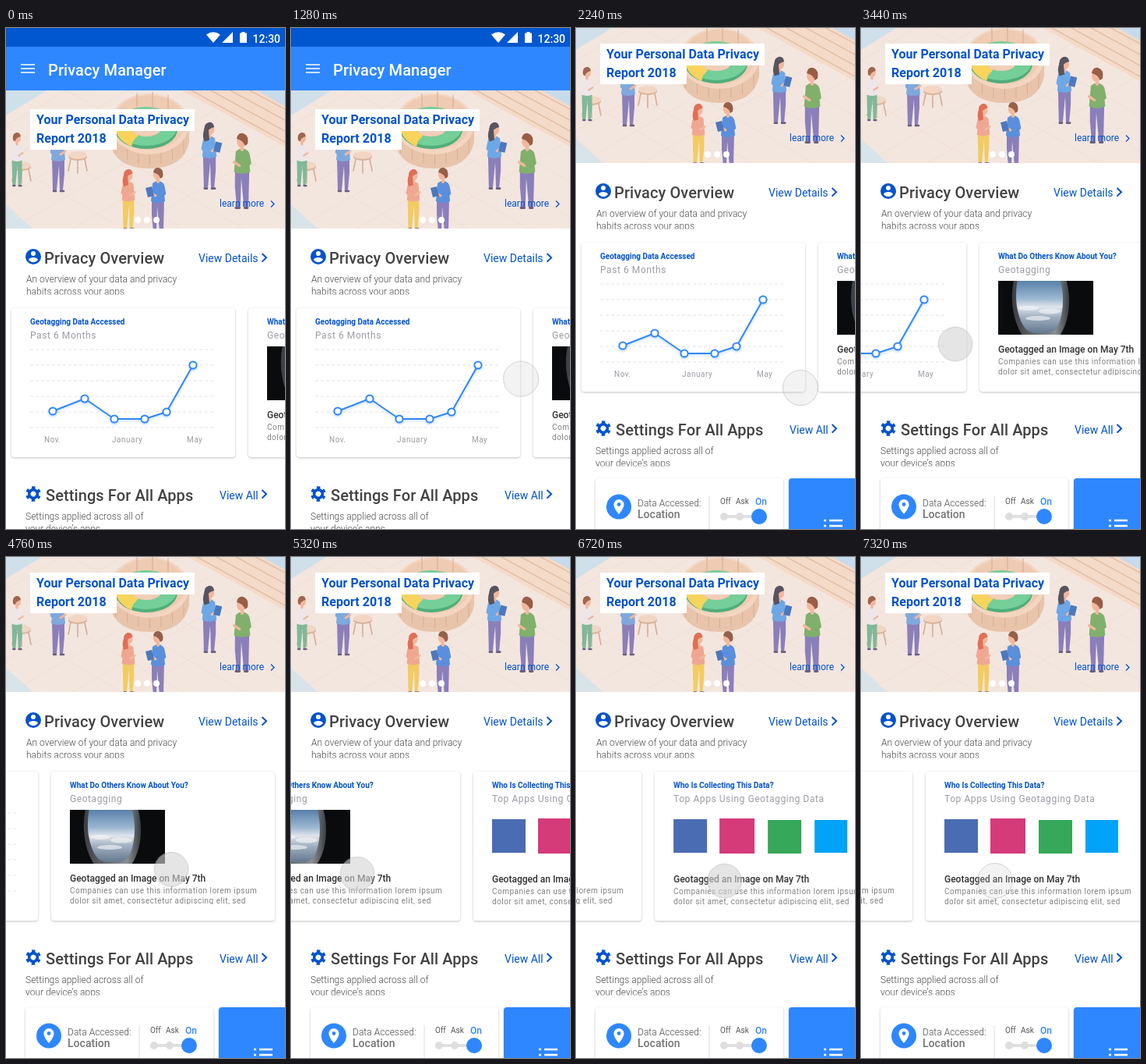
Animation, 358 px wide and 642 px high, one loop 8 s. Source, as an HTML page:

```html
<!DOCTYPE html>
<html lang="en">
<head>
<meta charset="utf-8">
<title>Privacy Manager</title>
<style>
html, body { margin: 0; width: 100%; height: 100%; overflow: hidden; background: #fff; }
svg { display: block; width: 358px; height: 642px; font-family: Roboto, Inter, sans-serif; }
.bar { font-size: 20px; font-weight: 500; letter-spacing: .1px; fill: #fff; }
.clock { font-size: 14px; font-weight: 500; fill: #fff; }
.banner { font-size: 16px; font-weight: 700; letter-spacing: .03px; fill: #0052cc; }
.head { font-size: 20px; font-weight: 500; letter-spacing: .09px; fill: #424242; }
.link { font-size: 14px; fill: #0052cc; }
.more { font-size: 12px; fill: #0052cc; }
.note { font-size: 12px; font-weight: 300; letter-spacing: .03px; fill: #484848; }
.title { font-size: 10px; font-weight: 700; fill: #0052cc; }
.sub { font-size: 12px; letter-spacing: .57px; fill: #9a9ba2; }
.strong { font-size: 12px; font-weight: 500; fill: #303030; }
.body { font-size: 10px; letter-spacing: .47px; fill: #808080; }
.axis { font-size: 10px; letter-spacing: .5px; fill: #9a9ba2; }
.card { fill: #fff; filter: drop-shadow(0 1px 1.5px rgba(0,0,0,.24)); }
.chev { fill: none; stroke: #0052cc; stroke-width: 2; }
.chev.thin { stroke-width: 1.3; }
</style>
</head>
<body>
<svg viewBox="0 0 358 642">
  <defs>
    <clipPath id="bannerClip"><rect y="80" width="358" height="177"/></clipPath>
    <clipPath id="noteClip"><rect y="310" width="358" height="31.5"/><rect y="615" width="358" height="30.5"/></clipPath>
    <clipPath id="cardClip"><rect y="358" width="285" height="171"/></clipPath>
    <clipPath id="photoClip"><rect x="24" y="408" width="122" height="69"/></clipPath>
    <linearGradient id="sky" x2="0" y2="1">
      <stop offset="0" stop-color="#46729f"/><stop offset=".4" stop-color="#9db8d2"/>
      <stop offset=".54" stop-color="#e0e5eb"/><stop offset=".72" stop-color="#9fafc0"/>
      <stop offset="1" stop-color="#64788e"/>
    </linearGradient>
    <linearGradient id="rim"><stop offset="0" stop-color="#3a3e42"/><stop offset=".75" stop-color="#8b9094"/><stop offset="1" stop-color="#3a3e42"/></linearGradient>
  </defs>
  <rect width="358" height="642" fill="#fff"/>
  <g id="page">
    <g id="scene" clip-path="url(#bannerClip)"></g>
    <path d="M31 104H242V132H142V156H31z" fill="#fff"/>
    <text class="banner" x="39" y="123">Your Personal Data Privacy</text>
    <text class="banner" x="39" y="147">Report 2018</text>
    <text class="more" x="274" y="229">learn more</text>
    <path class="chev thin" d="M340 221.5l4 4-4 4"/>
    <g fill="#fff"><circle cx="169" cy="246" r="4"/><circle cx="181" cy="246" r="4"/><circle cx="193" cy="246" r="4"/></g>

    <rect y="24" width="358" height="56" fill="#2e87ff"/>
    <rect width="358" height="24" fill="#0057cf"/>
    <path d="M257 8.5Q266 2 275 8.5L266 19zM291 5V19H277zM300 6.5h2.5V5h4v1.5H309V19H300z" fill="#fff"/>
    <text class="clock" x="316.5" y="19">12:30</text>
    <path d="M19 47H37M19 52H37M19 57H37" stroke="#fff" stroke-width="1.6"/>
    <text class="bar" x="54" y="61">Privacy Manager</text>

    <g transform="translate(35 293)"><circle r="10" fill="#0052cc"/><circle cy="-4" r="3" fill="#fff"/><path d="M0 .9C2 .9 6 2 6 4 4.7 5.9 2.5 7.2 0 7.2S-4.7 5.9-6 4C-6 2-2 .9 0 .9z" fill="#fff"/></g>
    <text class="head" x="49" y="302">Privacy Overview</text>
    <text class="link" x="247" y="300">View Details</text>
    <path class="chev" d="M328.5 289l5.5 5.3-5.5 5.3"/>
    <g clip-path="url(#noteClip)">
      <text class="note" x="26" y="326">An overview of your data and privacy</text>
      <text class="note" x="26" y="342">habits across your apps</text>
      <text class="note" x="25" y="630">Settings applied across all of</text>
      <text class="note" x="25" y="646">your device’s apps</text>
    </g>

    <g id="cards">
      <g transform="translate(7)">
        <rect class="card" y="359" width="287" height="191" rx="4"/>
        <text class="title" x="24" y="380">Geotagging Data Accessed</text>
        <text class="sub" x="24" y="398">Past 6 Months</text>
        <g id="chart"></g>
        <text class="axis" x="42" y="531">Nov.</text>
        <text class="axis" x="129" y="531">January</text>
        <text class="axis" x="225" y="531">May</text>
      </g>
      <g transform="translate(311)">
        <rect class="card" y="359" width="287" height="191" rx="4"/>
        <text class="title" x="24" y="380">What Do Others Know About You?</text>
        <text class="sub" x="24" y="398">Geotagging</text>
        <g clip-path="url(#photoClip)">
          <rect x="24" y="408" width="122" height="69" fill="#090b0d"/>
          <path d="M46 400C38 425 41 460 58 482H100C117 462 119 425 109 400z" fill="url(#rim)"/>
          <path d="M50 402C44 426 47 452 58 468Q63 475 74 475H88Q99 473 103 460C109 440 108 420 102 402z" fill="url(#sky)"/>
          <g fill="#f3f5f8" opacity=".65"><ellipse cx="63" cy="443" rx="13" ry="3"/><ellipse cx="90" cy="447" rx="14" ry="3.5"/><ellipse cx="75" cy="456" rx="16" ry="3"/></g>
        </g>
        <g class="copy"></g>
      </g>
      <g transform="translate(615)">
        <rect class="card" y="359" width="287" height="191" rx="4"/>
        <text class="title" x="24" y="380">Who Is Collecting This Data?</text>
        <text class="sub" x="24" y="398">Top Apps Using Geotagging Data</text>
        <rect x="24" y="420" width="43" height="43" fill="#4a6cb3"/>
        <rect x="83" y="419" width="45" height="45" fill="#d53a79"/>
        <rect x="145" y="421" width="43" height="43" fill="#37a75a"/>
        <rect x="205" y="421" width="42" height="42" fill="#00a3f7"/>
        <g class="copy" transform="translate(0 1)"></g>
      </g>
    </g>

    <g transform="translate(35 597) rotate(30)" fill="none" stroke="#0052cc"><circle r="5.3" stroke-width="3.8"/><circle r="8" stroke-width="3.6" stroke-dasharray="4.19" stroke-dashoffset="2.1"/></g>
    <text class="head" x="51" y="606">Settings For All Apps</text>
    <text class="link" x="274" y="604">View All</text>
    <path class="chev" d="M328.5 592l5.5 5.3-5.5 5.3"/>

    <rect class="card" x="25" y="661" width="241" height="110" rx="4"/>
    <rect class="card" x="273" y="661" width="120" height="110" rx="4" style="fill:#2e87ff"/>
    <g transform="translate(55 697.5)"><circle r="16" fill="#2e87ff"/><path d="M0-9.5A6.6 6.6 0 0 1 6.6-3C6.6 2 0 9.5 0 9.5S-6.6 2-6.6-3A6.6 6.6 0 0 1 0-9.5z" fill="#fff"/><circle cy="-3" r="2.4" fill="#2e87ff"/></g>
    <text class="note" x="79" y="697">Data Accessed:</text>
    <text x="79" y="712" font-size="14" font-weight="500" fill="#757575">Location</text>
    <path d="M171 684V760" stroke="#ddd"/>
    <g font-size="10" fill="#555"><text x="185" y="694">Off</text><text x="205" y="694">Ask</text></g>
    <text x="230" y="695" font-size="12" font-weight="500" fill="#2e87ff">On</text>
    <path d="M190 710H230" stroke="#e0e0e0" stroke-width="4"/>
    <g fill="#dedede"><circle cx="190" cy="710" r="5"/><circle cx="210" cy="710" r="5"/></g>
    <circle cx="235" cy="710" r="10" fill="#2e87ff"/>
    <path d="M318 715H321M325 715H342M318 722H321M325 722H342" stroke="#fff" stroke-width="2.3"/>
  </g>
  <g id="finger"><circle id="touch" r="22.5" fill="#d4d4d4" stroke="#999" stroke-opacity=".6" stroke-width=".7"/></g>
</svg>
<script>
const LOOP = 8000;
const SMOOTH = 'cubic-bezier(.4,0,.2,1)';
const $ = id => document.getElementById(id);

// Banner artwork
const ellipse = (x, y, rx, ry, fill) => `<ellipse cx="${x}" cy="${y}" rx="${rx}" ry="${ry}" fill="${fill}"/>`;
const shape = (d, fill) => `<path d="${d}" fill="${fill}"/>`;
const line = (d, color, width) => `<path d="${d}" fill="none" stroke="${color}" stroke-width="${width}" stroke-linecap="round" stroke-linejoin="round"/>`;

// A standing figure 86 units tall, top of the head at (x, y)
function person(x, y, size, hair, top, pants, face, long, tablet) {
  const skin = '#f2b79d';
  return `<g transform="translate(${x} ${y}) scale(${size * face} ${size})">` +
    shape('M-8 40H8L8 60 6 82H2L1 50-2 82H-7z', pants) +
    line('M-6 83H-3M3 83H7', '#6b5f80', 2.6) +
    shape('M-7 20Q0 14 7 20L9 43Q0 47 -9 43z', top) +
    line('M-6 23L-8 33 3 36', top, 4.5) + line('M3 36L9 32', skin, 3) +
    (tablet ? shape('M8 24l8 2-3 12-8-2z', '#4c78bd') : '') +
    line('M0 12V18', skin, 4) +
    ellipse(1, 9, 5, 6.5, skin) +
    shape('M6 6Q5-1-1 0-8 2-6 12L-3 14Q-2 8 6 6z', hair) +
    (long ? shape('M-6 7Q-10 17-6 24L0 22-1 10z', hair) : '') + '</g>';
}

function stool(x, y) {
  return line(`M${x - 8} ${y}l-4 20M${x + 8} ${y}l4 20M${x} ${y}v23`, '#d5ad94', 1.6) +
    ellipse(x, y + 2, 12, 5, '#d9b299') + ellipse(x, y, 12, 5, '#f2d6c3');
}

function scene() {
  let art = '<rect y="80" width="358" height="177" fill="#f3e6df"/>';
  let tiles = '', steps = '';
  for (let i = -2; i < 7; i++) tiles += `M${i * 78} 80l310 180M${i * 78} 80l-310 180`;
  art += line(tiles, '#f0dfd5', 1);
  art += shape('M0 80H52L0 112z', '#cfe0ea') + shape('M0 226L34 257H0z', '#d8e3ea');

  // Stairs in the far right corner
  art += shape('M226 80H358V152z', '#f4dac8');
  for (let i = 0; i < 5; i++) steps += `M${238 + i * 25} 80L358 ${146 - i * 14}`;
  art += line(steps, '#e2bfa8', 1.5) + shape('M322 80H358V100z', '#c6dcec');

  // Round table with a ring chart on top
  art += shape('M133 124V146Q140 180 184 180T235 146V124z', '#e8c4ab');
  for (let i = 0; i < 7; i++) art += line(`M${141 + i * 14.5} ${157 + 18 * Math.sin(Math.PI * (i + .5) / 7)}v-18`, '#d9ae93', 1);
  art += ellipse(184, 123, 51, 39, '#f3d5c0') + ellipse(184, 121, 46, 35, '#eecbb2');
  art += ellipse(180, 130, 40, 25, '#4fae7b') + ellipse(180, 126, 40, 25, '#74cf99');
  art += shape('M180 126L140 126Q141 143 161 152L163 145z', '#f8d45d');
  art += ellipse(180, 128, 20, 11, '#ddb59c') + ellipse(180, 130, 18, 9, '#f0cfb8');
  art += line('M168 84V104M188 82V104M208 86V104', '#d9af96', 1.2);

  art += stool(20, 176) + stool(92, 163);
  art += person(14, 134, .82, '#a0654d', '#eee6e8', '#7fb89a', 1, false, false);
  art += person(67, 126, 1, '#4d4b63', '#7fa9dd', '#8b7fba', 1, true, false);
  art += person(261, 121, 1.02, '#58545f', '#6da7e6', '#8a7fba', 1, true, true);
  art += person(303, 135, 1.15, '#9a5c45', '#80b06c', '#8a7fba', -1, false, false);
  art += person(157, 181, .92, '#e06f55', '#f0a792', '#f2cb62', 1, true, false);
  art += person(195, 179, 1, '#96604a', '#5a8fdd', '#8a7fba', -1, false, true);
  return art;
}

function chart() {
  const pts = [[53, 491], [94, 475], [132, 501], [171, 501], [199, 492], [233, 432]];
  let art = '';
  for (let y = 412; y <= 512; y += 20) art += `<path d="M24 ${y}H262" stroke="#e2e2e5" stroke-dasharray="4 3"/>`;
  art += '<g style="filter:drop-shadow(0 2px 1.5px rgba(46,135,255,.25))">' + line('M' + pts.join('L'), '#2e87ff', 2);
  for (const [x, y] of pts) art += `<circle cx="${x}" cy="${y}" r="4.6" fill="#fff" stroke="#2e87ff" stroke-width="2"/>`;
  return art + '</g>';
}

$('scene').innerHTML = scene();
$('chart').innerHTML = chart();
for (const g of document.querySelectorAll('.copy')) {
  g.innerHTML = '<text class="strong" x="24" y="500">Geotagged an Image on May 7th</text>' +
    '<g clip-path="url(#cardClip)"><text class="body" x="24" y="515">Companies can use this information lorem ipsum</text>' +
    '<text class="body" x="24" y="528">dolor sit amet, consectetur adipiscing elit, sed</text></g>';
}

// Motion: rows of [time, values..., easing to the next row]
function play(el, rows, frame) {
  const steps = rows.map(row => ({ offset: row[0] / LOOP, easing: 'linear', ...frame(...row.slice(1)) }));
  steps.push({ ...steps[steps.length - 1], offset: 1 });
  el.animate(steps, { duration: LOOP, iterations: Infinity });
}
const move = (x, y, easing = 'linear') => ({ transform: `translate(${x}px, ${y}px)`, easing });

play($('page'), [
  [0, 0, 0], [1788, 0, 0, SMOOTH], [2248, 0, -84]
], move);

play($('cards'), [
  [0, 0, 0], [3100, 0, 0, SMOOTH], [3500, -161, 0], [3600, -161.5, 0],
  [4500, -161.5, 0, SMOOTH], [5320, -381, 0], [5800, -383, 0],
  [6220, -383, 0, SMOOTH], [7040, -531, 0], [7320, -532, 0]
], move);

play($('finger'), [
  [0, 335, 385], [1200, 335, 385, 'ease-out'], [1320, 288, 461],
  [2480, 288, 461, 'ease-in-out'], [2600, 279, 407],
  [3100, 279, 407, SMOOTH], [3500, 119, 405],
  [3780, 119, 405, SMOOTH], [4320, 303, 396],
  [4500, 303, 396, SMOOTH], [5320, 85, 406],
  [5340, 85, 406, SMOOTH], [5800, 315, 415.5],
  [6200, 315, 415.5], [6240, 309.5, 415.5, SMOOTH], [7060, 172, 415]
], move);

play($('touch'), [
  [0, 0, .27, 1], [1199, 0, .27, 1], [1200, 1, .27, 1],
  [2919, 1, .27, 1], [2920, 1, .6, .97],
  [3780, 1, .6, .97], [3840, 1, .27, 1],
  [4280, 1, .27, 1], [4320, 1, .6, .97],
  [5340, 1, .6, .97], [5400, 1, .27, 1],
  [5930, 1, .27, 1], [6040, 1, .6, .97],
  [7060, 1, .6, .97], [7300, 1, .27, 1]
], (opacity, fillOpacity, size) => ({ opacity, fillOpacity, transform: `scale(${size})` }));
</script>
</body>
</html>
```
